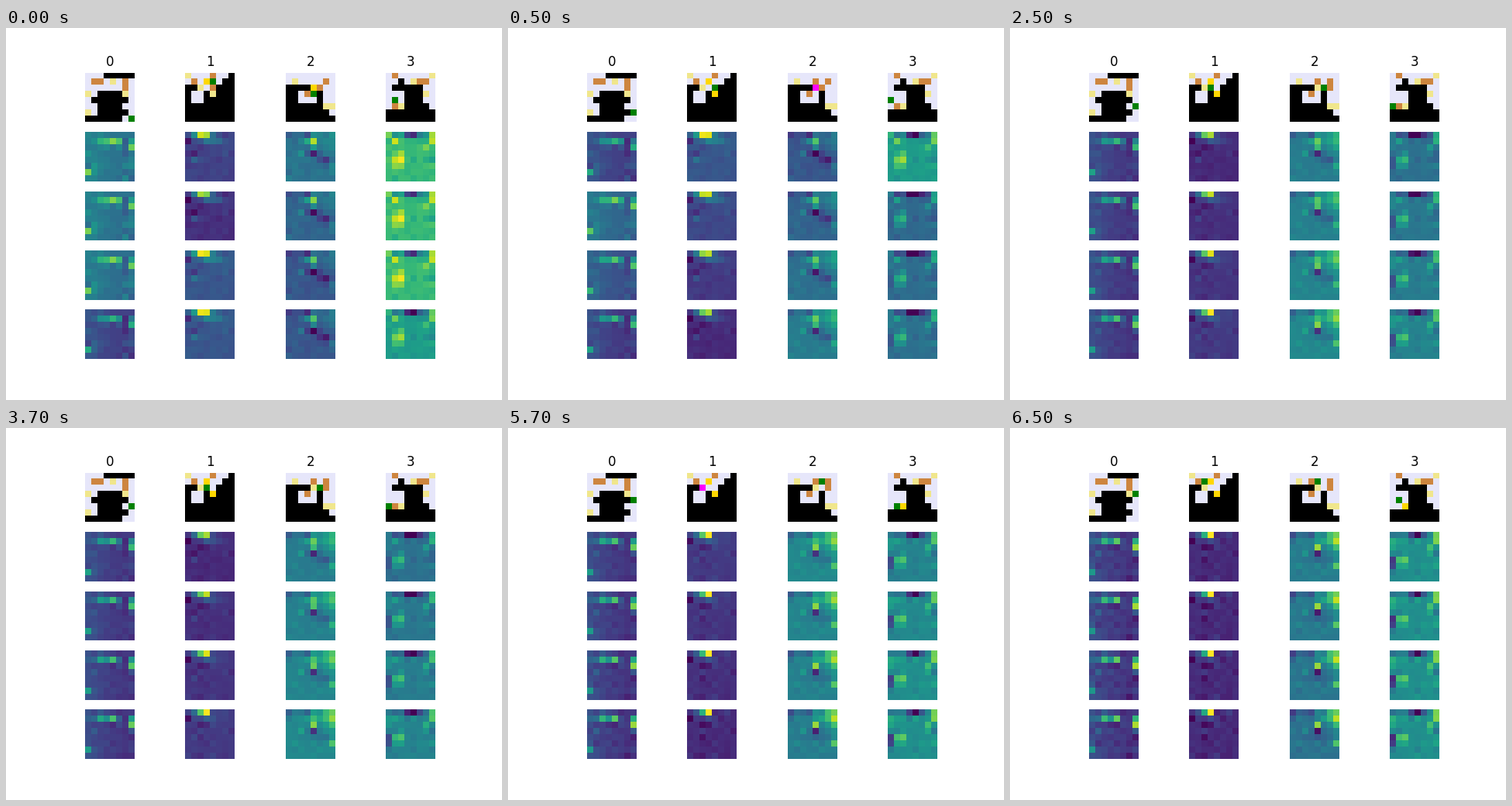
Recreate the animation shown at these times as a matplotlib script. Size 640 by 480 pixels, loop 8000 ms.

```python
import numpy as np
import matplotlib.pyplot as plt
from matplotlib.animation import FuncAnimation
from matplotlib.colors import to_rgb

SIZE = 8
MAPS = 4            # activation maps below each board
LAST_TICK = 15
MOVES = {"U": (-1, 0), "D": (1, 0), "L": (0, -1), "R": (0, 1)}
ROWS, COLS = np.mgrid[:SIZE, :SIZE]


def ease(x):
    return x * x * (3 - 2 * x)


class Puzzle:
    """Box-pushing board; walls are boxes of (top, bottom, left, right)."""

    def __init__(self, walls, boxes, targets, agent, moves):
        self.wall = np.zeros((SIZE, SIZE), bool)
        for top, bottom, left, right in walls:
            self.wall[top:bottom + 1, left:right + 1] = True
        for cell in targets:
            self.wall[cell] = False
        self.boxes, self.targets = boxes, targets
        self.agent, self.moves = agent, moves

    def state(self, step):
        boxes, agent = set(self.boxes), self.agent
        for move in self.moves[:step]:
            dr, dc = MOVES[move]
            agent = (agent[0] + dr, agent[1] + dc)
            if agent in boxes:
                boxes.remove(agent)
                boxes.add((agent[0] + dr, agent[1] + dc))
        return boxes, agent

    def image(self, step):
        boxes, agent = self.state(step)
        img = np.full((SIZE, SIZE, 3), to_rgb("lavender"))
        img[self.wall] = 0
        for cell in self.targets:
            img[cell] = to_rgb("khaki")
        for cell in boxes:
            img[cell] = to_rgb("gold" if cell in self.targets else "peru")
        img[agent] = to_rgb("magenta" if agent in self.targets else "green")
        return img


def blob(row, col, start, end, tall=0.4, wide=0.4):
    """Gaussian bump whose height eases from start to end over the loop."""
    shape = np.exp(-((ROWS - row) / tall) ** 2 - ((COLS - col) / wide) ** 2)
    return lambda x: shape * (start + (end - start) * ease(x))


class Activation:
    """Background through a few (tick, level) points, bumps, and a grain
    that is strong on open floor and faint inside walls."""

    def __init__(self, wall, seed, background, blobs, tilt=0):
        rng = np.random.default_rng(seed)
        strength = np.where(wall, 0.02, 0.06)
        self.grains = rng.normal(0, 1, (2, SIZE, SIZE)) * strength
        self.background, self.blobs, self.tilt = background, blobs, tilt

    def image(self, tick):
        x = tick / LAST_TICK
        first, second = self.grains
        field = np.interp(tick, *zip(*self.background))
        field = field + first * (1 - ease(x)) + second * ease(x)
        field += self.tilt * (COLS / (SIZE - 1) - 0.5)
        field += sum(b(x) for b in self.blobs)
        return np.clip(field, 0, 1)


puzzles = [
    Puzzle([(0, 0, 3, 7), (3, 6, 2, 5), (4, 4, 1, 6), (6, 6, 6, 6),
            (7, 7, 0, 5)],
           [(1, 1), (1, 2), (1, 6), (2, 6)],
           [(1, 4), (3, 0), (3, 6), (6, 0)], (7, 7), "UUUU"),
    Puzzle([(0, 0, 7, 7), (1, 1, 6, 7), (2, 2, 5, 7), (3, 7, 3, 7),
            (2, 2, 0, 1), (3, 7, 0, 0), (5, 7, 1, 2)],
           [(0, 4), (1, 1), (1, 3), (2, 4)],
           [(0, 0), (1, 3), (2, 2), (3, 4)], (1, 4), "DLLU"),
    Puzzle([(2, 7, 0, 1), (2, 2, 2, 3), (3, 5, 5, 5), (5, 5, 2, 4),
            (6, 6, 2, 6), (7, 7, 2, 7)],
           [(1, 6), (2, 4), (2, 5), (3, 3)],
           [(1, 1), (2, 4), (5, 6), (5, 7)], (3, 4), "URUL"),
    Puzzle([(1, 1, 2, 2), (2, 2, 1, 5), (3, 5, 3, 5), (5, 5, 6, 6),
            (6, 7, 0, 7)],
           [(0, 1), (1, 5), (1, 6), (5, 1)],
           [(0, 7), (1, 4), (3, 6), (5, 2)], (4, 1), "LDRU"),
]

backgrounds = [
    [(0, .4), (2, .38), (3, .21), (4, .35), (6, .19), (15, .18)],
    [(0, .2), (1, .14), (2, .27), (3, .27), (6, .12), (9, .17), (12, .12)],
    [(0, .38), (2, .27), (3, .27), (6, .42), (9, .47), (15, .38)],
    [(0, .67), (2, .67), (3, .55), (4, .34), (6, .37), (11, .49)],
]

blobs = [
    [blob(1, 2.6, .3, .42, wide=1.8),       # bright streak, gap on its right
     blob(1, 4, .4, .4),
     blob(1, 5, .3, -.1),
     blob(1.7, 7, .45, .75, tall=.9),
     blob(6, 0, .25, .3)],
    [blob(0, 2.3, .75, .5, wide=1.2),       # peak drifts to the right
     blob(0, 3, .2, .5),
     blob(1, 4, .22, .06, tall=.6, wide=1.8),
     blob(1, 0, -.18, -.08)],
    [blob(1, 3.8, .55, .12, wide=.9),       # heat moves to the right edge
     blob(.8, 7, .1, .5, tall=1.6, wide=1.3),
     blob(2, 4, .1, .5),
     blob(3, 4.2, -.25, -.45),
     blob(4, 5.5, -.25, -.08, tall=.9, wide=.7),
     blob(5, 7, 0, .4),
     blob(0, 0, -.1, -.25, tall=.7)],
    [blob(0, 3.7, -.55, -.45, wide=1.4),    # dark notch and bright corner
     blob(.6, 7, .3, .5, tall=1),
     blob(1.3, 1, .1, .2, wide=1.2),
     blob(2.3, 6, .1, .28, tall=1.1),
     blob(4.2, 1.6, .45, .3, tall=1, wide=.7),
     blob(4.3, 0, 0, -.4, tall=1.1)],
]

activations = [Activation(puzzle.wall, seed, *parts) for seed, (puzzle, *parts)
               in enumerate(zip(puzzles, backgrounds, blobs, (-.1, 0, 0, 0)))]

fig, axes = plt.subplots(MAPS + 1, len(puzzles), figsize=(6.4, 4.8), dpi=100)
for ax in axes.flat:
    ax.axis("off")
for col, ax in enumerate(axes[0]):
    ax.set_title(str(col))
boards = [ax.imshow(p.image(0)) for ax, p in zip(axes[0], puzzles)]
heat = [[ax.imshow(np.zeros((SIZE, SIZE)), vmin=0, vmax=1) for ax in row]
        for row in axes[1:]]


def update(frame):
    step = (frame + 3) // 4
    for board, puzzle in zip(boards, puzzles):
        board.set_data(puzzle.image(step))
    # the last map of one step is the first map of the next
    for k, row in enumerate(heat):
        for picture, activation in zip(row, activations):
            picture.set_data(activation.image((MAPS - 1) * step + k))
    return boards + sum(heat, [])


anim = FuncAnimation(fig, update, frames=16, interval=500, repeat=True)
plt.show()
```
